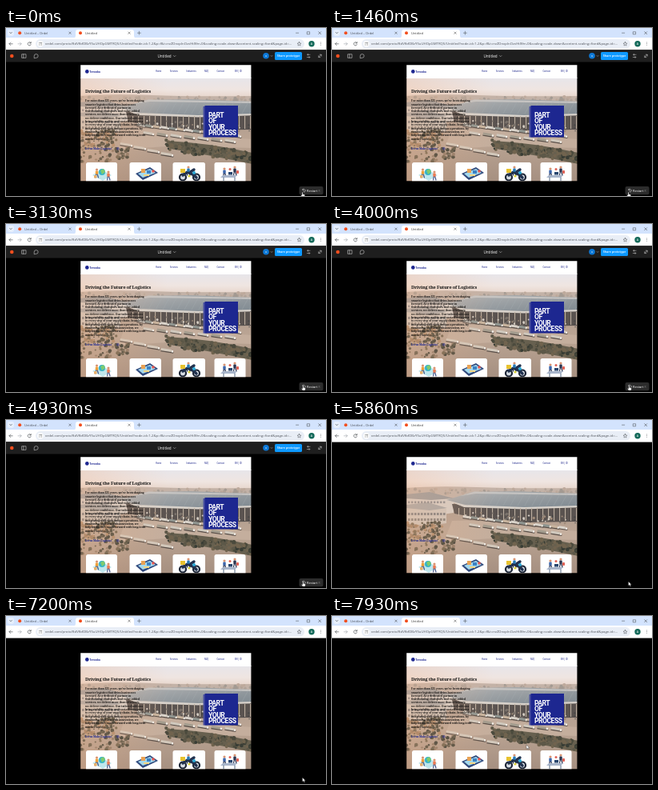
Animation, 400 px wide and 210 px high, one loop 8 s. Source, as an HTML page:

```html
<!DOCTYPE html>
<html lang="en">
<head>
<meta charset="utf-8">
<title>Prototype preview</title>
<style>
html, body { margin: 0; width: 100%; height: 100%; overflow: hidden; background: #000; }
svg { display: block; width: 100vw; height: 100vh; }
text { font-family: "Open Sans", sans-serif; white-space: pre; }
.serif { font-family: "Noto Serif", serif; font-weight: 700; }
.slogan { font-family: Roboto, sans-serif; font-weight: 700; }
.line { fill: none; stroke-linecap: round; stroke-linejoin: round; }
</style>
</head>
<body>
<svg id="stage" viewBox="0 0 400 210" preserveAspectRatio="none">
  <defs>
    <linearGradient id="sky" x2="0" y2="1">
      <stop offset="0" stop-color="#e7e5ea"/><stop offset=".5" stop-color="#efe5e1"/><stop offset="1" stop-color="#e3cdbf"/>
    </linearGradient>
    <linearGradient id="yard" x2="0" y2="1">
      <stop offset="0" stop-color="#a8968a"/><stop offset=".5" stop-color="#bba594"/><stop offset="1" stop-color="#a58f80"/>
    </linearGradient>
    <linearGradient id="roof" x2="1" y2="1">
      <stop offset="0" stop-color="#b3b3b3"/><stop offset="1" stop-color="#7d8890"/>
    </linearGradient>
    <linearGradient id="glow">
      <stop offset="0" stop-color="#f0b48a" stop-opacity=".32"/><stop offset="1" stop-color="#f0b48a" stop-opacity="0"/>
    </linearGradient>
    <clipPath id="page"><path d="M93.2 46.3H306.4V191.3H93.2Z"/></clipPath>
    <filter id="soft"><feGaussianBlur stdDeviation=".4"/></filter>
  </defs>
  <rect width="400" height="210"/>
  <g id="browser"></g>
  <g clip-path="url(#page)">
    <g id="photo" filter="url(#soft)"></g>
    <g id="site"></g>
    <g id="copy"></g>
    <g id="slogan"></g>
  </g>
  <g id="toolbar"></g>
  <g id="restart"></g>
  <path id="arrow" d="M0 0V5.2L1.3 4.1 2.2 6 3.1 5.6 2.2 3.8H3.8Z" fill="#fff" stroke="#222" stroke-width=".35"/>
  <path id="hand" d="M-.5 0Q.1-.7.6 0V2.2L2.7 2.7Q3.2 3 3 4L2.5 5.6H-.6L-2 3.5Q-1.7 2.7-.5 3.5Z" fill="#fff" stroke="#222" stroke-width=".35"/>
</svg>
<script>
const LOOP = 8000;
const NAVY = '#1d2790';
const $ = id => document.getElementById(id);

const rect = (x, y, w, h, fill, r = 0) => `<rect x="${x}" y="${y}" width="${w}" height="${h}" rx="${r}" fill="${fill}"/>`;
const dot = (x, y, r, fill) => `<circle cx="${x}" cy="${y}" r="${r}" fill="${fill}"/>`;
const shape = (d, fill) => `<path d="${d}" fill="${fill}"/>`;
const line = (d, color, w = .6) => `<path class="line" d="${d}" stroke="${color}" stroke-width="${w}"/>`;
const text = (x, y, size, fill, str, extra = '') => `<text x="${x}" y="${y}" font-size="${size}" fill="${fill}" ${extra}>${str}</text>`;
const cross = (x, y, r) => line(`M${x - r} ${y - r}L${x + r} ${y + r}M${x + r} ${y - r}L${x - r} ${y + r}`, '#333', .5);

function seeded(seed) {
  return () => (seed = (seed * 16807) % 2147483647) / 2147483647;
}

function drawBrowser() {
  const ink = '#3c4043';
  const url = 'ordel.com/proto/8dVfbfDBzYSuUHOpGMTRQS/Untitled?node-id=1-2&amp;p=f&amp;t=nvZDnxpInOzvHtWm-0' +
    '&amp;scaling=scale-down&amp;content-scaling=fixed&amp;page-id=...';
  $('browser').innerHTML =
    rect(0, 0, 400, 13, '#d3e3fd') + rect(0, 12, 400, 15.6, '#fff') +
    rect(2, 2, 8, 8, '#e6effd', 2.4) + line('M4.7 5.4L6 6.8 7.3 5.4', ink) +
    dot(17.2, 6.2, 2, '#f24e1e') + text(23, 7.7, 4, '#4a4e55', 'Untitled – Ordel') + cross(80, 6.2, 1.2) +
    shape('M84 12.5Q87 12.5 87 9.5V5Q87 2 90 2H157Q160 2 160 5V9.5Q160 12.5 163 12.5Z', '#fff') +
    dot(93, 6.2, 2, '#f24e1e') + text(99, 7.7, 4, '#333', 'Untitled') + cross(154, 6.2, 1.2) +
    line('M164.4 6.2H168.4M166.4 4.2V8.2M362.5 6.2H365.7', ink, .5) +
    line('M376.6 4.8H379.6V7.8H376.6Z', ink, .5) + cross(392.2, 6.2, 1.5) +
    line('M8.2 19.8H4L5.8 18M4 19.8L5.8 21.6', ink) +
    line('M15 19.8H19.2L17.4 18M19.2 19.8L17.4 21.6', '#9aa0a6') +
    line('M31 18.7A2.1 2.1 0 1 0 31.2 20.6M31.2 17.4V19H29.6', ink) +
    rect(37, 14, 336, 11.6, '#e9eef6', 5.8) + dot(43, 19.8, 3.8, '#fff') +
    line('M41.3 18.7H43.5M41.3 21H42M43.7 21H44.8', ink, .5) +
    `<circle cx="44.3" cy="18.7" r=".6" fill="none" stroke="${ink}" stroke-width=".4"/>` +
    text(49, 21.3, 4.27, '#50545b', url) +
    line('M366.5 17.4L367.2 19 369 19.2 367.6 20.4 368 22.1 366.5 21.2 365 22.1 365.4 20.4 364 19.2 365.8 19Z', ink, .45) +
    dot(382, 19.8, 3.7, '#146a5a') + text(382, 21.2, 3.6, '#fff', 'A', 'text-anchor="middle"') +
    [18, 19.8, 21.6].map(y => dot(393.5, y, .45, ink)).join('');
}

function drawToolbar() {
  const pale = '#d8d8d8';
  $('toolbar').innerHTML =
    rect(0, 27.2, 400, 15.3, '#1e1e1e') + dot(7.3, 35, 2.3, '#f24e1e') +
    line('M20 32.8H25V37.3H20ZM21.8 32.8V37.3', pale, .55) +
    line('M35.2 37.4V35A2.5 2.4 0 1 1 37.7 37.4Z', pale, .55) +
    text(198, 36.7, 4.6, '#fff', 'Untitled', 'text-anchor="middle"') + line('M209.4 34.5L210.7 35.8 212 34.5', pale, .5) +
    dot(325, 34.8, 3.8, '#0d79d8') + text(325, 36.1, 3.4, '#fff', 'a', 'text-anchor="middle"') +
    line('M331 34.5L332 35.5 333 34.5', pale, .45) + rect(336, 30, 34, 10, '#0d99ff', 1.6) +
    text(353, 36.2, 3.7, '#fff', 'Share prototype', 'text-anchor="middle" font-weight="600"') +
    line('M376.3 33.3H380M376.3 36.5H380M377.4 32.4V34.2M379 35.6V37.4', pale, .5) +
    line('M391 36.4L394 33.4M392.2 33.2H394.2V35.2M390.8 34.6V36.6H392.8', pale, .55);
  $('restart').innerHTML =
    rect(366.5, 198, 30, 10.2, '#2c2c2c', 2) + line('M370.7 202H373.2A1.5 1.5 0 1 1 372 204.7M371.8 200.8L370.6 202 371.8 203.2', '#fff', .5) +
    text(376, 204.6, 4, '#fff', 'Restart') + text(390.4, 204.5, 3.4, '#888', 'R');
}

function drawPhoto() {
  const rnd = seeded(71);
  // Scatters blobs over a box whose top edge drops by `slope` per unit of x.
  const scatter = (n, x, y, w, h, colors, r, slope = 0) => Array.from({ length: n }, () => {
    const dx = rnd() * w;
    return dot(x + dx, y + dx * slope + rnd() * h, r * (.5 + rnd()), colors[Math.floor(rnd() * colors.length)]);
  }).join('');
  const truck = (x, y, w, tone) => `<g transform="translate(${x} ${y}) rotate(9)">` +
    rect(0, 2.6, w + 3, 1.6, '#574d47') + rect(0, 0, w, 3, tone) + rect(w + .3, .8, 2.2, 2.5, '#f1eee8') + '</g>';
  const leaves = ['#4b4a3d', '#5d5848', '#71644f', '#393d35'];

  let art = rect(92, 62, 216, 30, 'url(#sky)') + rect(92, 88, 216, 105, 'url(#yard)') +
    shape('M92 85Q130 82 180 84T308 85V98H92Z', '#c3b2a7') +
    scatter(90, 93, 86, 213, 7, ['#b1a398', '#a39a92', '#bda99b'], 1.5) +
    // offices on the left
    shape('M92 96L124 93 152 99V116L124 120 92 116Z', '#d6cec7') +
    shape('M92 93L122 90 152 98 124 100 92 98Z', '#9a9a9b') +
    shape('M92 109L122 106 143 111V129L122 132 92 130Z', '#cec5bc') +
    shape('M92 106L120 103 144 110 122 113 92 110Z', '#a6a6a6');
  for (let x = 95; x < 143; x += 4) {
    art += rect(x, 101.5, 2.4, 2.6, '#8d8d90') + rect(x, 116, 2.6, 3, '#7e7f81') + rect(x, 123, 2.6, 3, '#85817d');
  }
  // warehouse hall and roof
  art += shape('M150 105L306 107V127L240 128 190 124 153 117Z', '#5a5350') +
    shape('M143 100L176 90 230 89 308 92V108L240 110 165 107Z', 'url(#roof)') +
    shape('M160 95L178 89.5 308 92V94L180 92Z', '#c6c4c2') +
    shape('M143 100L166 106 240 109 308 107V109.2L240 111.6 165 109Z', '#d8d2cb');
  for (let x = 160; x < 306; x += 9) art += line(`M${x + 8} 92.5L${x} 107`, '#a6adb1', .35);
  for (let x = 158; x < 306; x += 7) art += rect(x, 110, 1.1, 10 + Math.min(6, (x - 158) * .1), '#bcae9f');
  art += scatter(60, 165, 115, 140, 10, ['#d6cec4', '#7b736c', '#a08c7a', '#4c4a49'], 1.1, .04) +
    shape('M150 126Q190 124 240 133L306 139V150L215 147 140 152Z', '#c4ae9d');
  for (let i = 0; i < 13; i++) {
    art += truck(164 + i * 10, 119 + i * 1.1, 8, ['#d9d3ca', '#8f9590', '#c7b39d'][i % 3]);
  }
  for (let i = 0; i < 7; i++) {
    art += truck(172 + i * 17, 129 + i * 1.6, 11, ['#cfc8bd', '#a39c8e'][i % 2]);
  }
  for (let i = 0; i < 4; i++) art += truck(143 + i * 17, 143 + i * 4, 13, '#d2c8bb');
  // planted strip and foreground trees
  art += shape('M200 141Q250 143 308 156V170Q250 158 205 151Z', '#67604f') +
    scatter(130, 200, 140, 107, 13, leaves, 1.9, .14) +
    scatter(95, 92, 128, 46, 20, [...leaves, '#9a7b5f', '#b08c6c'], 1.6) +
    scatter(60, 92, 149, 62, 18, [...leaves, '#8f7a67'], 1.6) +
    rect(92, 62, 110, 130, 'url(#glow)');
  $('photo').innerHTML = art;
}

function person(x, y, coat, pants) {
  return dot(x, y, 1.6, '#d99472') + rect(x - 1.7, y + 1.5, 3.4, 4.7, coat, 1) +
    line(`M${x - .8} ${y + 6}L${x - 1.5} ${y + 10}M${x + .8} ${y + 6}L${x + 2} ${y + 10}`, pants, 1.2);
}

function drawSite() {
  const nav = [[187, 'Home'], [205, 'Services'], [225.5, 'Industries'], [248, 'FAQ'], [263.5, 'Contact'], [286, 'EN | ID']];
  const cards = [[100, 39], [154.5, 39.5], [208.5, 40.5], [260.5, 39]];
  const wheel = x => `<circle cx="${x}" cy="186.5" r="4" fill="#d7dde4" stroke="#1c2536" stroke-width="2.2"/>`;
  const art = [
    shape('M108 184L119 177 132 184 121 191Z', '#bfe6ec') + dot(120, 180, 4, '#35b3c9') +
      shape('M118 178L122 176 124 180 120 183Z', '#7fcb6f') + person(113.5, 177, '#f0a13a', '#45568a') +
      person(128, 180, '#ee7a52', '#45568a') + rect(110, 184, 3.5, 3.5, '#e8b06b'),
    shape('M162 182L180 174 190 181 171 190Z', '#314a7d') + shape('M165 182L180 176 187 181 171 187Z', '#a4d9ee') +
      rect(169, 176, 5, 5, '#e9a254') + rect(176, 178, 5, 4, '#3c82c4') + dot(184, 179, 1.8, '#ed5850') + rect(172, 183, 7, 2, '#f1d484'),
    wheel(221) + wheel(238) +
      line('M221 184L227 180 235 184 238 187M229 181L235 177', '#22324f', 3.4) +
      person(228, 174, '#2579b8', '#1f2d44') + rect(218, 176, 6, 5, '#e8c22e') + dot(235, 181, 2, '#2ba8d6') + dot(229, 185, 1.6, '#d8cf3a'),
    person(273, 176, '#3c66ac', '#273150') + person(286, 174, '#2c3550', '#273150') +
      shape('M271 184H289L286 187H268Z', '#a9b6cb') + line('M272 187V191M286 187V191', '#536782', 1) +
      rect(278, 180, 5, 3.5, '#28466f') + dot(280, 176.5, 1.5, '#df6155') + rect(288, 178, 3, 4, '#df6155', 1)
  ];
  $('site').innerHTML = rect(93, 46, 214, 17, '#fff') + dot(101.3, 54.4, 2.3, NAVY) +
    text(104.5, 55.6, 3, NAVY, 'Tervoska', 'font-weight="700"') +
    nav.map(([x, s]) => text(x, 55.1, 2.5, '#3a4299', s, 'font-weight="600"')).join('') +
    text(99, 152, 3.3, NAVY, 'Let us Make Logistics', 'class="serif" letter-spacing="-.12"') +
    `<circle cx="139.8" cy="150.8" r="1.5" fill="none" stroke="${NAVY}" stroke-width=".5"/>` +
    line('M139 150.8H140.6M139.8 150V151.6', NAVY, .35) +
    cards.map(([x, w], i) => rect(x, 168, w, 29, '#fff', 2.5) + art[i]).join('');
}

function drawIntro() {
  const copy = [
    'For more than 125 years, we’ve been shaping', 'smarter logistics that drive businesses',
    'forward. As a dedicated partner in', 'warehousing, transport, and value-added',
    'services, we deliver more than efficiency,', 'we deliver confidence. Our tailored add-ons',
    'bring stability, agility, and cost-effectiveness', 'to every step of your supply chain. Seamlessly',
    'integrating with your unique operations, by', 'combining tradition with innovation, we',
    'help businesses move forward with long-term', 'market success.'];
  $('copy').innerHTML =
    text(99, 81.2, 5.7, '#171717', 'Driving the Future of Logistics', 'class="serif" letter-spacing="-.18"') +
    copy.map((s, i) => text(99, 92.2 + i * 4.3, 3.45, '#201d1b', s, 'class="serif" letter-spacing="-.1"')).join('');
  $('slogan').innerHTML =
    rect(246.5, 98, 5, 38.5, '#4a519f') + rect(248.5, 97, 41.5, 39.5, NAVY) +
    ['PART', 'OF', 'YOUR', 'PROCESS'].map((s, i) =>
      text(253, 111.5 + i * 7.5, 8.6, '#fff', s, 'class="slogan" letter-spacing="-.5"')).join('');
}

const clamp = v => Math.max(0, Math.min(1, v));
const ease = v => v * v * (3 - 2 * v);
const span = (t, a, b) => ease(clamp((t - a) / (b - a)));
const show = (id, on) => $(id).setAttribute('visibility', on ? 'visible' : 'hidden');
const move = (id, x, y) => $(id).setAttribute('transform', `translate(${x} ${y})`);

// Remaining distance of a damped spring, 1 at rest, slightly negative on overshoot.
function spring(ms) {
  if (ms <= 0) return 1;
  const w = .0058, damp = 1.2;
  return Math.exp(-damp * w * ms) * (Math.cos(w * ms) + damp * Math.sin(w * ms));
}

function update(t) {
  const away = t < 5330 ? 0 : spring(t - 5960);
  move('copy', -92 * away, 0);
  move('slogan', 62 * away, 0);

  const controls = t < 5580;
  show('toolbar', controls);
  show('restart', controls);
  show('hand', controls);
  show('arrow', !controls);
  const lift = span(t, 1950, 2350);
  move('hand', 370.5 + lift * .8, 205.5 - lift * 3.2);
  const glide = span(t, 7300, 7860);
  move('arrow', 370.5 - glide * 127.5, 202 - glide * 41);
}

drawBrowser();
drawToolbar();
drawPhoto();
drawSite();
drawIntro();

const start = performance.now();
function frame() {
  update((performance.now() - start) % LOOP);
  requestAnimationFrame(frame);
}
update(0);
requestAnimationFrame(frame);
</script>
</body>
</html>
```
